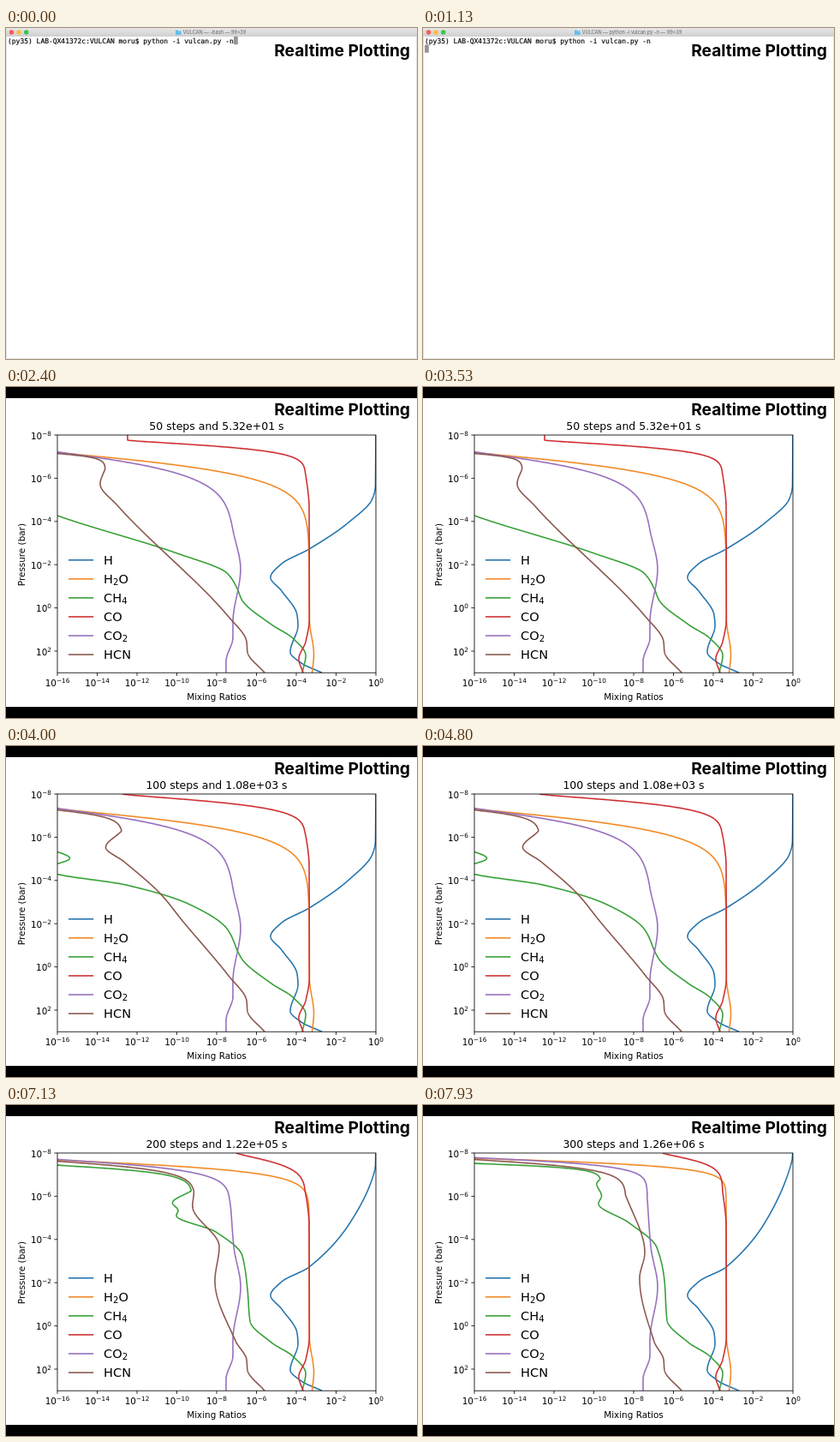
These frames come from a looping animation (480 by 386 pixels, 8 s). An HTML page:

```html
<!DOCTYPE html>
<html lang="en">
<head>
<meta charset="utf-8">
<title>Realtime Plotting</title>
<style>
  html, body { margin: 0; width: 100%; height: 100%; overflow: hidden; background: #fff; }
  svg { display: block; width: 100vw; height: 100vh; }
  text { white-space: pre; }
  .heading { font: 700 19.2px Inter, sans-serif; text-anchor: end; }
  .bar { font: 5.6px Inter, sans-serif; fill: #666; }
  .mono { font: 7.975px "DejaVu Sans Mono", monospace; stroke: #000; stroke-width: .15; }
  .plot { font: 10.42px "DejaVu Sans", sans-serif; }
  .title { font-size: 12.5px; }
  .legend { font-size: 14.58px; }
  .mid { text-anchor: middle; }
  .end { text-anchor: end; }
  .curve { fill: none; stroke-width: 1.6; stroke-linejoin: round; }
  .axis { fill: none; stroke: #000; stroke-width: .83; }
</style>
</head>
<body>
<svg viewBox="0 0 480 386">
  <defs>
    <linearGradient id="chrome" x2="0" y2="1">
      <stop stop-color="#e6e6e6"/><stop offset="1" stop-color="#d0d0d0"/>
    </linearGradient>
    <clipPath id="axes"><rect x="60" y="56" width="372" height="277.2"/></clipPath>
  </defs>
  <g id="terminal">
    <rect width="480" height="386" fill="#fff"/>
    <path d="M.5 10V385.5H479.5V10" fill="none" stroke="#e2e2e2"/>
    <rect width="480" height="10" fill="url(#chrome)"/>
    <circle cx="6.5" cy="5" r="2.7" fill="#fc5b57"/>
    <circle cx="15" cy="5" r="2.7" fill="#fdbc40"/>
    <circle cx="23.7" cy="5" r="2.7" fill="#34c84a"/>
  </g>
  <g id="figure" class="plot">
    <rect width="480" height="386"/>
    <rect y="13" width="480" height="360" fill="#fff"/>
  </g>
  <text class="heading" x="472" y="33.1">Realtime Plotting</text>
</svg>
<script>
const LOOP = 8000, PLOT_START = 2400;
const terminal = document.getElementById("terminal");
const figure = document.getElementById("figure");
const cues = [
  { el: terminal, start: 0, end: PLOT_START },
  { el: figure, start: PLOT_START, end: LOOP },
];

function add(parent, tag, attrs, html = "") {
  const el = document.createElementNS("http://www.w3.org/2000/svg", tag);
  for (const key in attrs) el.setAttribute(key, attrs[key]);
  el.innerHTML = html;
  return parent.appendChild(el);
}

function scene(parent, start, end) {
  const el = add(parent, "g", {});
  cues.push({ el, start, end });
  return el;
}

// Terminal
const COMMAND = "(py35) LAB-QX41372c:VULCAN moru$ python -i vulcan.py -n";
const OUTPUT = [
  "Warning... the output file: HD209.vul already exists.",
  "",
  "Warning! P_b and P_t assgined in vulcan.cfg are out of range of the file.",
  "Constant extension will be used.",
  "Using special form for the reaction: OH + CH3 + M -> CH3OH + M",
  "Rate coefficients greater than 1e-6:",
  "R276:  161.394510081",
  "R524:  4.42600953331e-06",
  "Initializing with the default solar abundance.",
  "Equilibrium calculation (Fastchem) finished.",
];
const LINE = 9.57, CHAR = 4.8;

function shell(start, end, process, left, lineCount, cursorCol, cursorRow) {
  const g = scene(terminal, start, end);
  add(g, "path", { d: `M${left} 2.5h2.5l1 1h3v4.5h-6.5z`, fill: "#62bfee" });
  add(g, "text", { class: "bar", x: left + 8.7, y: 7.1 }, `VULCAN — ${process} — 99×39`);
  [COMMAND, ...OUTPUT.slice(0, lineCount)].forEach((line, row) =>
    add(g, "text", { class: "mono", x: 2, y: 17.8 + row * LINE }, line.replace(">", "&gt;")));
  add(g, "rect", {
    x: 2 + cursorCol * CHAR, y: 10 + cursorRow * LINE, width: CHAR, height: 9.2, fill: "#959595",
  });
}
const RUNNING = "python -i vulcan.py -n";
shell(0, 1130, "-bash", 198, 0, COMMAND.length, 0);
shell(1130, 1200, RUNNING, 177, 0, 0, 1);
shell(1200, 1270, RUNNING, 177, 3, 0, 4);
shell(1270, PLOT_START, RUNNING, 177, 10, 0, 11);

// Each stage: height and thickness of the photolysis front, and where H saturates.
const STAGES = [
  { start: PLOT_START, title: "50 steps and 5.32e+01 s", front: 76, width: 22, knee: 130 },
  { start: 3670, title: "100 steps and 1.08e+03 s", front: 73, width: 22, knee: 126 },
  { start: 4870, title: "150 steps and 6.52e+03 s", front: 67, width: 17.5, knee: 117 },
  { start: 6130, title: "200 steps and 1.22e+05 s", front: 64, width: 10.8, knee: 85 },
  { start: 7400, title: "300 steps and 1.26e+06 s", front: 62, width: 7.7, knee: 75 },
];
const OFF_LEFT = 58;
const cutAt = (top, width, floor = OFF_LEFT, power = 1.15) => ({ top, width, floor, power });
const NO_CUT = cutAt(0, 1);

// A species follows its "x,y" knots, fading towards a floor above its cut.
const SPECIES = [
  {
    label: "H", color: "#2776af",
    knots: ({ knee }) => `432,40 431.5,${knee - 15} 428,${knee} 400,${106 + .4 * knee} 354,189 322,206 309,222 322,238`,
    deep: "340,266 341,278 332,309 345,322 369,333.2",
    cut: () => NO_CUT,
  },
  {
    label: "H2O", color: "#f28a26",
    knots: () => "354,150",
    deep: "354.3,270 359.5,312 357.5,333.2",
    cut: ({ front, width }) => cutAt(front, width),
  },
  {
    label: "CH4", color: "#37a037",
    knots: (_, i) => [
      "40,142 60,150 200,194 258,217 270,235 276,249",
      "40,117 74.5,131 44,144 60,149.5 140,162 215,185 258,213 276,249",
      "122.5,102 100,114 129.5,126.5 96.5,139.5 185,156 243,174 270,225 277,250",
      "217.5,100 194.5,114 201,123 199,129 245,148 276,176 282,215 285,252",
      "208,86 203,92 208.5,106 205,115 240,137 273,166 282,205 285,251",
    ][i],
    deep: "310,277 335,293 350,313 346,333.2",
    cut: (_, i) => [NO_CUT, NO_CUT, cutAt(87, 5), cutAt(70, 7.5), cutAt(68, 4.5)][i],
  },
  {
    label: "CO", color: "#cf3032",
    knots: () => "350,100 354,140",
    deep: "354.3,270 350,297 342,317 347,333.2",
    cut: (_, i) => cutAt(i ? 56 : 62, [9.5, 12.2, 15, 13.5, 11][i], [142, 136, 245, 269, 280][i], 1.3),
  },
  {
    label: "CO2", color: "#966fbd",
    knots: () => "262,110 266,165",
    deep: "274,212 265,275 265,292 257,320 257,333.2",
    cut: ({ front, width }) => cutAt(front - .8, width),
  },
  {
    label: "HCN", color: "#8b584e",
    knots: (_, i) => [
      "116,95 110,113 130,138 260,268",
      "136,99 116.5,118 138,135 180,172 207,205 260,268",
      "186,97 165,117 177,143 213,182 222,212 262,270",
      "221,100 218,118 249,165 244,205 268,275",
      "237,105 259,172 253,202 270,276",
    ][i],
    deep: "281,297 282,309 302,333.2",
    cut: ({ front }, i) => cutAt(front + 1.3, [4, 7, 12, 9.3, 9][i]),
  },
];

// Monotone cubic x(y) through the knots, constant above the first one.
function spline(knots) {
  const p = knots.split(" ").map(s => s.split(",").map(Number));
  const slope = p.slice(1).map((b, i) => (b[0] - p[i][0]) / (b[1] - p[i][1]));
  const tangent = p.map((_, i) => {
    const a = slope[i - 1] ?? slope[i], b = slope[i] ?? a;
    return a * b <= 0 ? 0 : 2 * a * b / (a + b);
  });
  return y => {
    if (y <= p[0][1]) return p[0][0];
    const i = Math.max(0, p.findIndex(k => k[1] >= y) - 1);
    const [x0, y0] = p[i], [x1, y1] = p[i + 1];
    const h = y1 - y0, t = (y - y0) / h, s = 1 - t;
    return x0 * s * s * (1 + 2 * t) + x1 * t * t * (1 + 2 * s)
      + h * t * s * (tangent[i] * s - tangent[i + 1] * t);
  };
}

function profile({ knots, deep, cut }, stage, i) {
  const base = spline(knots(stage, i) + " " + deep);
  const { top, width, floor, power } = cut(stage, i);
  const points = [];
  for (let y = 56; y <= 333.2; y += .4) {
    const fade = Math.exp(-((Math.max(0, y - top) / width) ** power));
    points.push(`${(base(y) + (floor - base(y)) * fade).toFixed(2)} ${y.toFixed(1)}`);
  }
  return "M" + points.join("L");
}

STAGES.forEach((stage, i) => {
  const g = scene(figure, stage.start, STAGES[i + 1]?.start ?? LOOP);
  add(g, "text", { class: "title mid", x: 246, y: 50 }, stage.title);
  const curves = add(g, "g", { "clip-path": "url(#axes)" });
  for (const species of SPECIES)
    add(curves, "path", { class: "curve", stroke: species.color, d: profile(species, stage, i) });
});

// Axes and legend
const power = n => `10<tspan dy="-4" font-size="7.3">${String(n).replace("-", "−")}</tspan>`;
add(figure, "rect", { class: "axis", x: 60, y: 56, width: 372, height: 277.2 });
for (let n = -16; n <= 0; n += 2) {
  const x = 432 + n * 23.25;
  add(figure, "path", { class: "axis", d: `M${x} 333.2v3.65` });
  add(figure, "text", { class: "mid", x, y: 349.3 }, power(n));
}
for (let n = -8; n <= 2; n += 2) {
  const y = 56 + (n + 8) * 25.2;
  add(figure, "path", { class: "axis", d: `M60 ${y}h-3.65` });
  add(figure, "text", { class: "end", x: 53, y: y + 4.6 }, power(n));
}
add(figure, "text", { class: "mid", x: 246, y: 364.5 }, "Mixing Ratios");
add(figure, "text", { class: "mid", transform: "translate(21.5 195.6) rotate(-90)" }, "Pressure (bar)");
SPECIES.forEach(({ label, color }, i) => {
  const y = 201.8 + i * 22.05;
  const [name, digit, rest] = label.split(/(\d)/).filter(Boolean);
  const parts = /\d/.test(label)
    ? label.replace(/(\d)(.*)/, '<tspan dy="2.4" font-size="10.2">$1</tspan><tspan dy="-2.4">$2</tspan>')
    : label;
  add(figure, "path", { class: "curve", stroke: color, d: `M73 ${y}h29.2` });
  add(figure, "text", { class: "legend", x: 114, y: y + 5 }, parts);
});

const origin = performance.now();
function draw() {
  const t = (performance.now() - origin) % LOOP;
  for (const { el, start, end } of cues)
    el.style.display = t >= start && t < end ? "" : "none";
  requestAnimationFrame(draw);
}
draw();
</script>
</body>
</html>
```
